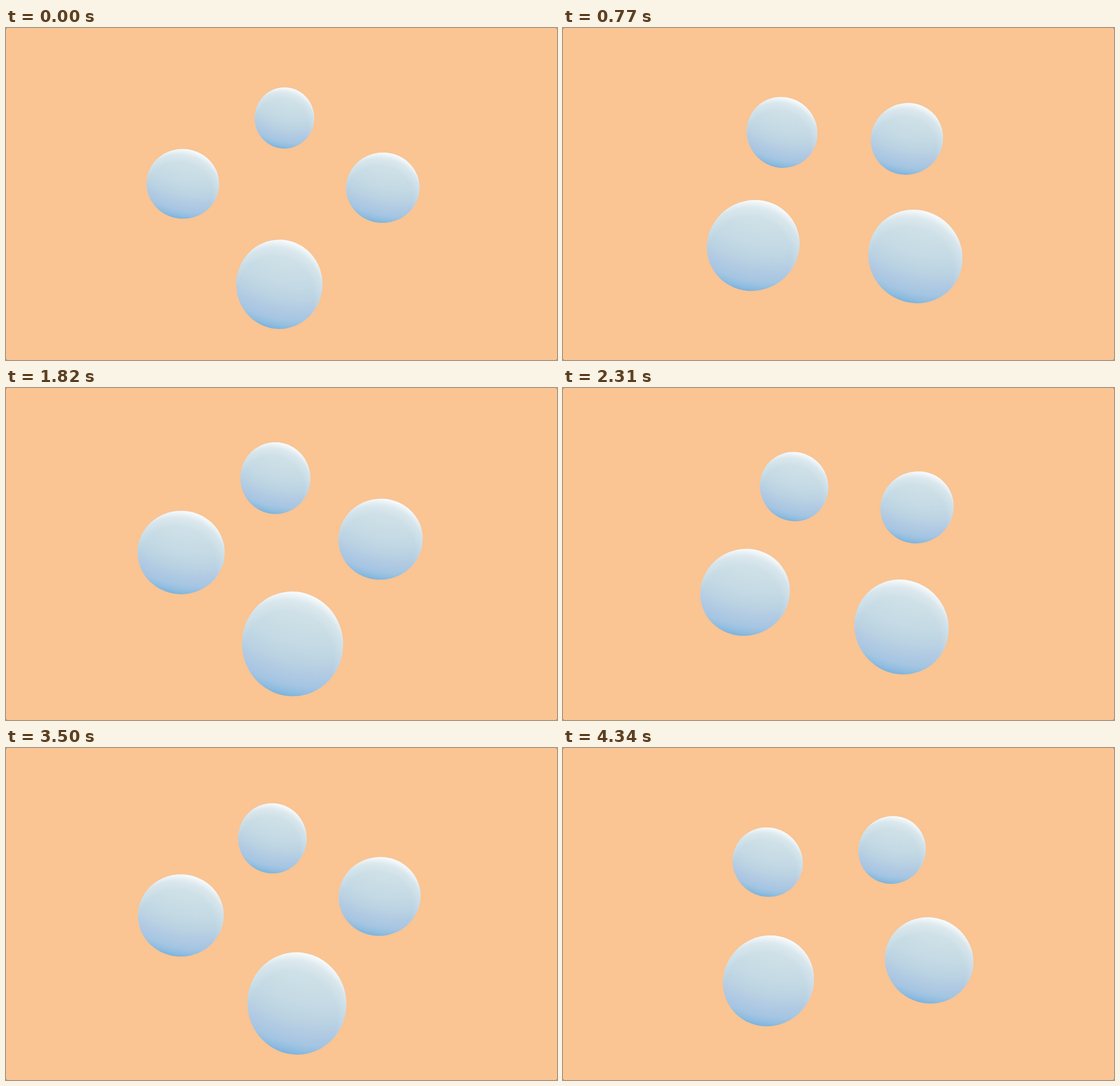
Recreate the animation shown at these times as an HTML page. Size 964 by 581 pixels, loop 4410 ms.

```html
<!DOCTYPE html>
<html lang="en">
<head>
<meta charset="utf-8">
<title>Orbiting spheres</title>
<style>
  html, body { margin: 0; width: 100%; height: 100%; overflow: hidden; background: #4a3d33; }
  svg { display: block; width: 964px; height: 581px; }
</style>
</head>
<body>
<svg viewBox="0 0 964 581">
  <defs>
    <radialGradient id="body" cx=".75" cy="-.6" r="1.63">
      <stop offset=".38" stop-color="#d6e5eb"/>
      <stop offset=".58" stop-color="#cbdee6"/>
      <stop offset=".7" stop-color="#c3d9e4"/>
      <stop offset=".79" stop-color="#bad2e2"/>
      <stop offset=".86" stop-color="#b1cae3"/>
      <stop offset=".93" stop-color="#a4c5e2"/>
      <stop offset=".97" stop-color="#8fbde0"/>
      <stop offset="1" stop-color="#7bb2dc"/>
    </radialGradient>
    <radialGradient id="shine" cx=".45" cy=".64" r=".645">
      <stop offset=".7" stop-color="#fff" stop-opacity="0"/>
      <stop offset=".87" stop-color="#fff" stop-opacity=".22"/>
      <stop offset="1" stop-color="#fff" stop-opacity=".85"/>
    </radialGradient>
    <g id="ball">
      <circle r="1" fill="url(#body)"/>
      <circle r="1" fill="url(#shine)"/>
    </g>
  </defs>
  <rect width="964" height="581" rx="2" fill="#fac493"/>
  <use href="#ball"/>
  <use href="#ball"/>
  <use href="#ball"/>
  <use href="#ball"/>
</svg>
<script>
const LOOP = 4410, STEP = 70;
const HOLDS = [350, 1610, 2590, 3710, 4270];   // steps that repeat the previous pose
const RING = { x: 483.5, y: 276.1, rx: 175, ry: 140.6, depth: 0.185 };
const LENS = { x: 483, y: 290, focal: 590 };

// Turning points of the breathing: time in ms, sphere radius
const BREATHS = [
  [0, 62.6], [140, 78.4], [770, 70.6], [1750, 74.4], [2100, 64.5], [2500, 74.2],
  [3080, 61.2], [3480, 72.2], [3650, 63], [3950, 74], [LOOP, 67.5]
];

const balls = document.querySelectorAll("svg > use");
const ease = p => (1 - Math.cos(Math.PI * p)) / 2;
const clamp = p => Math.min(1, Math.max(0, p));

function radiusAt(time) {
  const next = BREATHS.findIndex(([t]) => t > time);
  const [t0, r0] = BREATHS[next - 1], [t1, r1] = BREATHS[next];
  return r0 + (r1 - r0) * ease((time - t0) / (t1 - t0));
}

// Steady turning in degrees, with one short slowdown
function angleAt(time) {
  const lag = 3.6 * ease(clamp((time - 1260) / 280));
  return -1.4 + 0.0548 * time - lag;
}

function placeBall(ball, degrees, radius) {
  const angle = degrees * Math.PI / 180;
  const near = 1 / (1 - RING.depth * Math.cos(angle));
  const x = RING.x + RING.rx * Math.sin(angle) * near;
  const y = RING.y + RING.ry * Math.cos(angle) * near;

  // Perspective stretches a sphere away from the lens centre.
  const dx = x - LENS.x, dy = y - LENS.y;
  const stretch = Math.sqrt(Math.hypot(1, Math.hypot(dx, dy) / LENS.focal));
  const turn = Math.atan2(dy, dx) * 180 / Math.PI;
  const r = radius * near;
  ball.setAttribute("transform",
    `translate(${x} ${y}) rotate(${turn}) scale(${r * stretch} ${r / stretch}) rotate(${-turn})`);
}

function draw(now) {
  let time = Math.floor((now % LOOP) / STEP) * STEP;
  if (HOLDS.includes(time)) time -= STEP;
  const angle = angleAt(time), radius = radiusAt(time);
  balls.forEach((ball, i) => placeBall(ball, angle + i * 90, radius));
}

let start;
function tick(now) {
  start ??= now;
  draw(now - start);
  requestAnimationFrame(tick);
}
draw(0);
requestAnimationFrame(tick);
</script>
</body>
</html>
```
